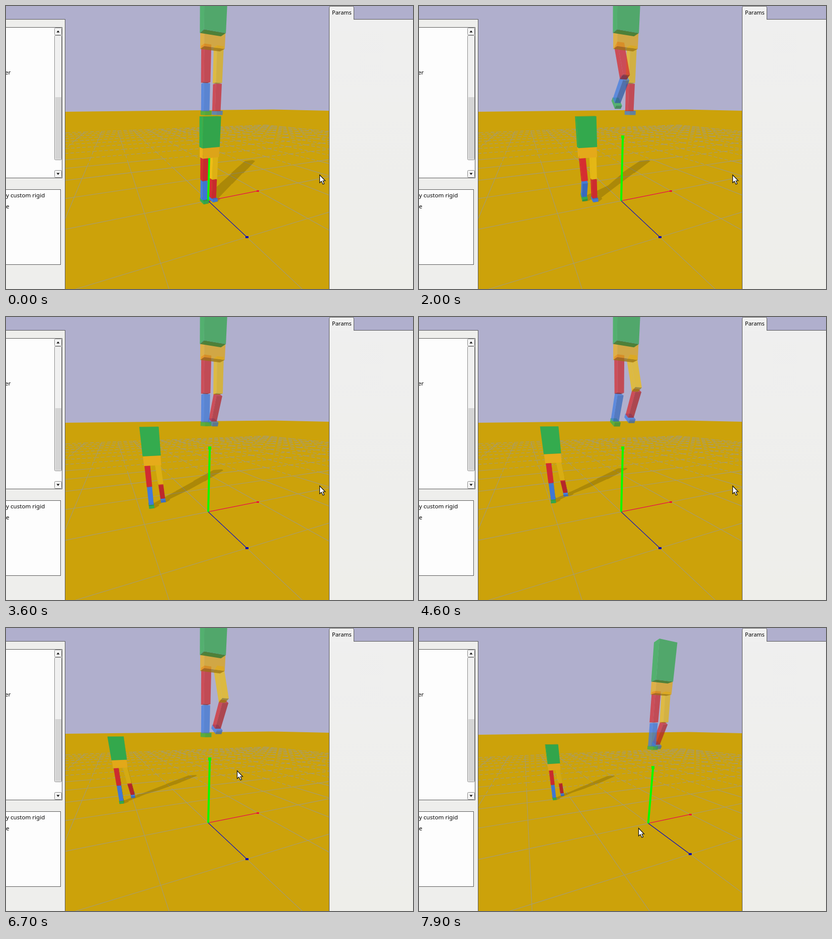
An HTML page with a canvas for the animation above (8 s loop, 809 px wide and 562 px high).

```html
<!DOCTYPE html>
<html lang="en">
<head>
<meta charset="utf-8">
<title>Walking figure</title>
<style>
html, body { margin: 0; width: 100%; height: 100%; overflow: hidden; background: #b0afcd; }
canvas { display: block; }
</style>
</head>
<body>
<canvas id="stage" width="809" height="562"></canvas>
<script>
const ctx = document.getElementById('stage').getContext('2d');
const LOOP = 8000, FOCAL = 370, CX = 380, CY = 358;
const PITCH = 22.4 * Math.PI / 180, YAW = 23.2 * Math.PI / 180;
const sp = Math.sin(PITCH), cp = Math.cos(PITCH), sy = Math.sin(YAW), cy = Math.cos(YAW);

const GREEN = [50, 165, 75], AMBER = [222, 165, 25], YELLOW = [222, 178, 20],
      RED = [200, 42, 46], BLUE = [62, 118, 210];
const LIGHT = [-.71, .41, .57];
const SHADOW = [1.74, -1.4];

// Middle of each step, in ms
const LEFT_STEPS = [2050, 5450], RIGHT_STEPS = [4450, 6550, 8700];

const mix = (a, b, k) => a + (b - a) * k;
const mixAll = (a, b, k) => a.map((v, i) => mix(v, b[i], k));
const clamp = v => Math.max(0, Math.min(1, v));
const progress = (t, from, to) => clamp((t - from) / (to - from));
const dot = (a, b) => a.reduce((s, v, i) => s + v * b[i], 0);

// ---- Motion ----

const pulses = (t, times, width) =>
  times.reduce((s, c) => s + Math.exp(-(((t - c) / width) ** 2)), 0);

// The shank folds a little before the thigh rises.
const stepPose = (t, times) => ({
  thigh: .45 * pulses(t, times, 550),
  shank: .9 * pulses(t + 300, times, 600),
  lean: 0
});

function walkerPose(left, right, t) {
  const stride = .8 * (1 - t / LOOP);
  return [
    { thigh: left.thigh * stride, shank: left.shank * stride, lean: 0 },
    { thigh: -.5 * right.shank, shank: .9 * right.shank, lean: .2 * right.shank }
  ];
}

function walkerPlace(t) {
  const u = t / 7900;
  return [-1.3 * u ** .75, 0, -2.01 * u ** 1.65];
}

function pointerAt(t) {
  const p = mixAll([623, 335], [459, 283], progress(t, 6500, 6700));
  return mixAll(p, [436, 397], progress(t, 6900, 7700));
}

// ---- Camera ----

const cam = { back: 0, side: 0, height: 0 };

function setCamera(k) {
  cam.back = mix(2.675, 3.013, k);
  cam.side = mix(.177, .689, k);
  cam.height = mix(1.355, 1.536, k);
}

function toView([x, y, z]) {
  const fwd = cam.back + x * sy - z * cy, down = cam.height - y;
  return [cam.side + x * cy + z * sy, down * cp - fwd * sp, fwd * cp + down * sp];
}
const toScreen = ([r, d, w]) => [CX + FOCAL * r / w, CY + FOCAL * d / w];
const project = p => toScreen(toView(p));

// ---- Drawing helpers ----

function trace(pts) {
  pts.forEach(([x, y], i) => i ? ctx.lineTo(x, y) : ctx.moveTo(x, y));
  ctx.closePath();
}
function polygon(pts, color) {
  ctx.fillStyle = color;
  ctx.beginPath();
  trace(pts);
  ctx.fill();
}
function area(p) {
  return p.reduce((s, [x, y], i) => {
    const [u, v] = p[(i + 1) % p.length];
    return s + x * v - u * y;
  }, 0);
}
function line(a, b, color, width) {
  ctx.strokeStyle = color;
  ctx.lineWidth = width;
  ctx.beginPath();
  ctx.moveTo(...a);
  ctx.lineTo(...b);
  ctx.stroke();
}
function rect(color, x, y, w, h) {
  ctx.fillStyle = color;
  ctx.fillRect(x, y, w, h);
}
function label(text, x, y, size) {
  ctx.fillStyle = '#000';
  ctx.font = `${size}px "Noto Sans", "Open Sans", sans-serif`;
  ctx.fillText(text, x, y);
}

// ---- Boxes and figures ----

// a + sum of axis * amount
function move(a, ...steps) {
  return steps.reduce((p, [axis, n]) => p.map((v, i) => v + axis[i] * n), a);
}

// Bit i of a corner's number tells which end of axis i it is on.
const FACES = [];
for (let axis = 0; axis < 3; axis++) {
  const a = 1 << axis, b = 1 << (axis + 1) % 3, c = 1 << (axis + 2) % 3;
  const ring = [0, b, b | c, c];
  FACES.push({ axis, sign: 1, idx: ring.map(n => n | a) }, { axis, sign: -1, idx: ring.reverse() });
}

function corners({ at, axes, size }) {
  return [...Array(8).keys()].map(n =>
    move(at, ...axes.map((axis, i) => [axis, (n >> i & 1 ? .5 : -.5) * size[i]])));
}

function drawBox(part, alpha) {
  const pts = corners(part).map(project);
  for (const { axis, sign, idx } of FACES) {
    const face = idx.map(i => pts[i]);
    if (area(face) >= 0) continue;
    const shade = .7 + .52 * Math.max(0, sign * dot(part.axes[axis], LIGHT));
    polygon(face, `rgba(${part.color.map(c => Math.min(255, Math.round(c * shade)))},${alpha})`);
  }
}

function buildFigure(base, turn, [left, rightLeg]) {
  const right = [Math.cos(turn), 0, Math.sin(turn)], up = [0, 1, 0];
  const front = [-Math.sin(turn), 0, Math.cos(turn)];
  const parts = [];

  function limb(angle, lean) {
    const c = Math.cos(angle), s = Math.sin(angle);
    return [right,
            move([0, 0, 0], [up, c], [front, -s], [right, -Math.sin(lean)]),
            move([0, 0, 0], [front, c], [up, s])];
  }
  function leg(side, { thigh, shank, lean }, colors) {
    const hip = move(base, [right, .08 * side], [up, .74]);
    const a = limb(thigh, lean), b = limb(-shank, lean);
    const knee = move(hip, [a[1], -.38]), ankle = move(knee, [b[1], -.31]);
    parts.push(
      { at: move(ankle, [b[1], -.02], [b[2], .02]), axes: b, size: [.085, .05, .14], color: colors[2] },
      { at: move(knee, [b[1], -.155]), axes: b, size: [.08, .31, .08], color: colors[1] },
      { at: move(hip, [a[1], -.185]), axes: a, size: [.085, .37, .085], color: colors[0] });
  }

  leg(1, rightLeg, [YELLOW, RED, BLUE]);
  leg(-1, left, [RED, BLUE, GREEN]);
  const axes = [right, up, front];
  parts.push({ at: move(base, [up, .785]), axes, size: [.26, .145, .11], color: AMBER },
             { at: move(base, [up, 1.065]), axes, size: [.27, .41, .11], color: GREEN });
  return parts;
}

function drawShadow(parts) {
  ctx.fillStyle = 'rgba(0,0,0,.16)';
  ctx.beginPath();
  for (const part of parts) {
    const pts = corners(part).map(([x, y, z]) => project([x + y * SHADOW[0], 0, z + y * SHADOW[1]]));
    for (const { idx } of FACES) {
      const face = idx.map(i => pts[i]);
      trace(area(face) < 0 ? face.reverse() : face);
    }
  }
  ctx.fill();
}

// ---- Ground ----

function gridSegment(a, b) {
  const near = .1;
  let p = toView(a), q = toView(b);
  if (p[2] < near && q[2] < near) return;
  const cut = (u, v) => mixAll(u, v, (near - u[2]) / (v[2] - u[2]));
  if (p[2] < near) p = cut(p, q);
  else if (q[2] < near) q = cut(q, p);
  ctx.setLineDash(p[2] > 5.5 ? [7, 4] : []);
  line(toScreen(p), toScreen(q), '#a59c74', 1.1);
}

function drawGround(k) {
  polygon([[118, 210 + 2 * k], [530 + 5 * k, 205.5 + k], [642, 208 + k], [642, 562], [118, 562]], '#cca20a');
  const N = 12;
  for (let i = -N; i <= N; i++)
    for (let j = -N; j < N; j++) {
      gridSegment([i, 0, j], [i, 0, j + 1]);
      gridSegment([j, 0, i], [j + 1, 0, i]);
    }
  ctx.setLineDash([]);
}

function drawAxis(end, color, width, w, h) {
  const p = project(end);
  line(project([0, 0, 0]), p, color, width);
  rect(color, Math.round(p[0] - w / 2), Math.round(p[1] - h / 2), w, h);
}

// ---- Window parts ----

const EDGE = '#5a5a5a';

function roundBox(fill, y, h) {
  ctx.fillStyle = fill;
  ctx.strokeStyle = '#8c8c8c';
  ctx.lineWidth = 1;
  ctx.beginPath();
  ctx.roundRect(96.5, y + .5, 14, h, 2);
  ctx.fill();
  ctx.stroke();
}
function arrowButton(y, dir) {
  roundBox('#f4f4f4', y, 14);
  const base = y + 7.5 + 2 * dir;
  polygon([[100.5, base], [106.5, base], [103.5, base - 4 * dir]], '#111');
}
function listBox(y, w, h) {
  rect(EDGE, 0, y, w, h);
  rect('#fdfdfd', 0, y + 1, w - 1, h - 2);
}

function drawLeftPanel() {
  rect(EDGE, 0, 26, 118, 536);
  rect('#eeeeec', 0, 27, 117, 535);
  listBox(42, 112, 300);
  roundBox('#f0f0f0', 58, 247);
  rect('#d5d5d5', 98, 181, 12, 123);
  arrowButton(43, 1);
  arrowButton(326, -1);
  label('er', -2, 136, 11.6);
  listBox(364, 109, 150);
  label('y custom rigid', 0, 380, 11.6);
  label('e', 0, 402, 11.6);
}

function drawRightPanel() {
  const fill = ctx.createLinearGradient(0, 27, 0, 562);
  fill.addColorStop(0, '#efefef');
  fill.addColorStop(1, '#eeeeea');
  rect(EDGE, 642, 26, 167, 536);
  rect(fill, 643, 27, 166, 535);
  ctx.fillStyle = '#f0f0f0';
  ctx.strokeStyle = EDGE;
  ctx.lineWidth = 1;
  ctx.beginPath();
  ctx.moveTo(642.5, 28);
  ctx.arcTo(642.5, .5, 667, .5, 3);
  ctx.arcTo(691.5, .5, 691.5, 27, 3);
  ctx.lineTo(691.5, 27);
  ctx.fill();
  ctx.stroke();
  label('Params', 648, 17, 11);
}

function drawPointer([x, y]) {
  ctx.save();
  ctx.translate(Math.round(x) + .5, Math.round(y) + .5);
  polygon([[0, 0], [0, 15.5], [3.5, 12.5], [6.5, 18.5], [9, 17.5], [6.5, 11.5], [11, 11.5]], '#fff');
  ctx.strokeStyle = '#111';
  ctx.lineWidth = 1.2;
  ctx.stroke();
  ctx.restore();
}

function draw(t) {
  const k = 1 - (1 - progress(t, 6700, 7900)) ** 2.5;
  setCamera(k);
  rect('#b0afcd', 0, 0, 809, 562);

  const left = stepPose(t, LEFT_STEPS), right = stepPose(t, RIGHT_STEPS);
  const walker = buildFigure(walkerPlace(t), .12 * Math.sin(Math.PI * t / LOOP), walkerPose(left, right, t));
  const ghost = buildFigure([-.04, 1.285, .09], 0, [left, right]);

  ctx.save();
  ctx.beginPath();
  ctx.rect(118, 0, 524, 562);
  ctx.clip();
  drawGround(k);
  drawShadow(walker);
  drawAxis([1, 0, 0], '#ee1038', 1.2, 5, 3);
  drawAxis([0, 0, 1], '#0808b4', 1.2, 6, 4);
  drawAxis([0, 1, 0], '#00ff00', 4, 6, 6);
  walker.forEach(part => drawBox(part, 1));
  ghost.forEach(part => drawBox(part, .75));
  ctx.restore();

  drawLeftPanel();
  drawRightPanel();
  drawPointer(pointerAt(t));
}

// The picture advances ten times a second after a short hold.
function tick() {
  const t = performance.now() % LOOP;
  draw(t < 300 ? 0 : Math.floor(t / 100) * 100);
  requestAnimationFrame(tick);
}
tick();
</script>
</body>
</html>
```
